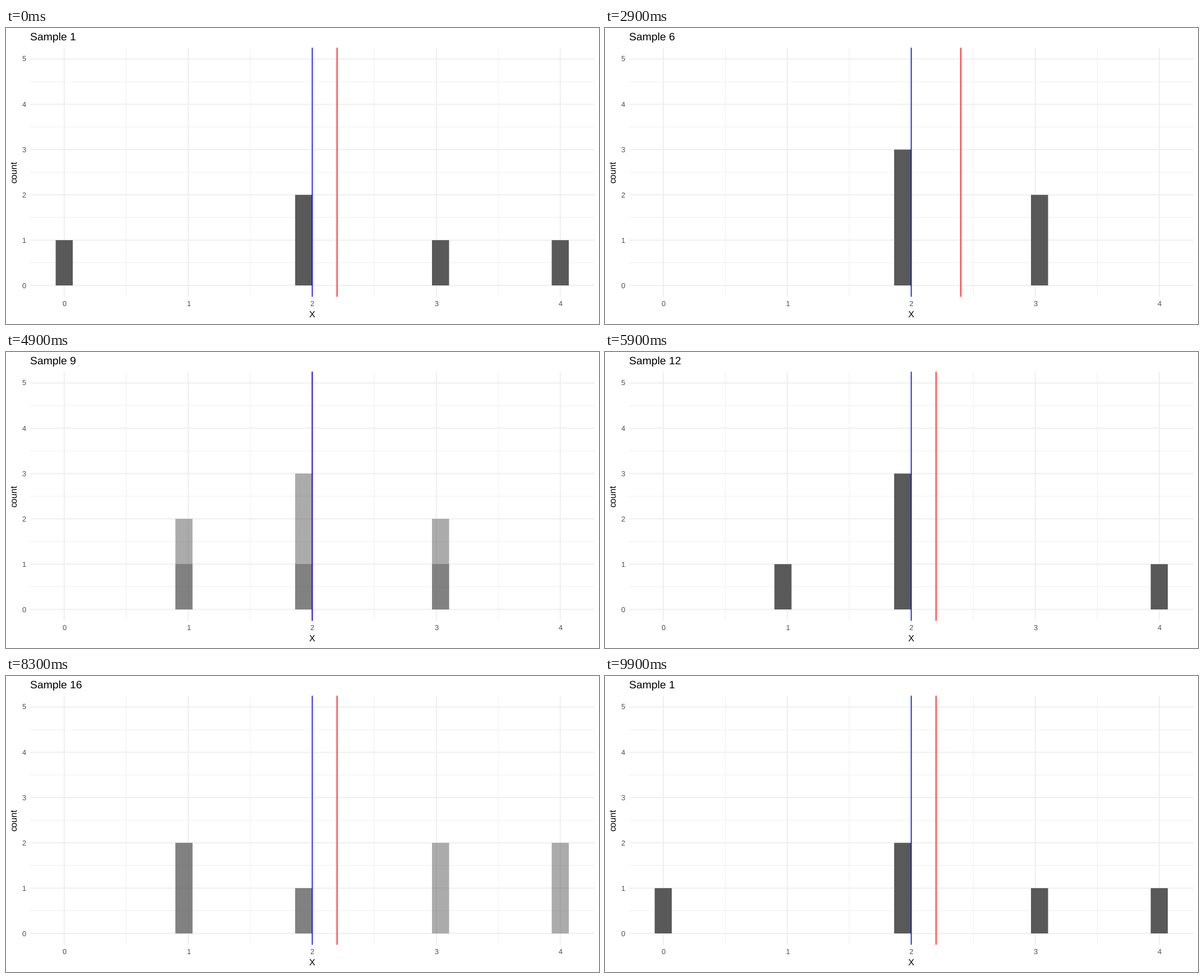
Animation of 1058 by 529 pixels, one loop 10 s. Source, as a matplotlib script:

```python
import matplotlib.pyplot as plt
import numpy as np
from matplotlib.animation import FuncAnimation

plt.rcParams.update({
    "font.family": "Liberation Sans",
    "text.hinting": "none",
    "path.snap": False,
    "lines.solid_capstyle": "butt",
})

W, H, DPI = 1058, 529, 105.8
LEFT, RIGHT, TOP, BOTTOM = 42.86, 1049.92, 35.2, 480.3
BIN = 4 / 29
LINE = 1.067  # points
GRID, BAR, TICK = "#ebebeb", "#595959", "#4d4d4d"

# Five draws per sample, values 0 to 4
SAMPLES = [[int(c) for c in s] for s in (
    "02234", "12223", "12234", "12233", "11223", "22233", "01224",
    "12233", "12223", "11233", "11223", "12224", "12223", "12233",
    "11223", "11233", "11244", "01223", "12233")]
COUNTS = [np.bincount(s, minlength=5) for s in SAMPLES]
MEANS = [np.mean(s) for s in SAMPLES]

# Tenths of a second at which one sample is half blended into the next
FADES = [4, 10, 16, 22, 28, 34, 39, 44, 49] + list(range(53, 99, 5))

fig = plt.figure(figsize=(10, 5), dpi=DPI, facecolor="white")
ax = fig.add_axes([LEFT / W, 1 - BOTTOM / H,
                   (RIGHT - LEFT) / W, (BOTTOM - TOP) / H])
ax.set_xlim(-2 * BIN, 4 + 2 * BIN)
ax.set_ylim(-0.25, 5.25)
ax.axis("off")


def label(x, y, text, size, color="black", **kw):
    """Text placed by pixels from the top left corner, y at the baseline."""
    kw.setdefault("va", "baseline")
    return fig.text(x / W, 1 - y / H, text, fontsize=size, color=color, **kw)


def px(v):
    return LEFT + (v + 2 * BIN) / (4 + 4 * BIN) * (RIGHT - LEFT)


def py(v):
    return BOTTOM - (v + 0.25) / 5.5 * (BOTTOM - TOP)


def grid(xs, ys, width):
    for y in ys:
        ax.axhline(y, color=GRID, lw=width, zorder=1, clip_on=False)
    for x in xs:
        ax.axvline(x, color=GRID, lw=width, zorder=1, clip_on=False)


grid(np.arange(4) + 0.5, np.arange(5) + 0.5, LINE / 2)
grid(range(5), range(6), LINE)

for v in range(5):
    label(px(v), 497, str(v), 8.8, TICK, ha="center")
for v in range(6):
    label(35.6, py(v) + 4.6, str(v), 8.8, TICK, ha="right")
label(px(2), 517.3, "X", 11, ha="center")
label(20, (TOP + BOTTOM) / 2, "count", 11, rotation=90,
      ha="right", va="center").set(ha="center", x=14.7 / W)
title = label(LEFT, 22.4, "", 13.2)

# Right-closed bins, so 2 falls in the bin that ends at 2
centers = np.ceil(np.arange(5) / BIN - 0.5 - 1e-9) * BIN
old_bars, new_bars = (
    ax.bar(centers, np.zeros(5), BIN, color=BAR, linewidth=0, zorder=z)
    for z in (2, 3))
mean_line = ax.axvline(2, color="red", lw=LINE, zorder=4, clip_on=False)
ax.axvline(2, color="blue", lw=LINE, zorder=5, clip_on=False)


def set_bars(bars, counts, alpha):
    for bar, n in zip(bars, counts):
        bar.set_height(n)
        bar.set_alpha(alpha)


def update(frame):
    now = sum(t < frame for t in FADES) % len(SAMPLES)
    nxt = (now + 1) % len(SAMPLES)
    mix = 0.5 if frame in FADES else 0
    set_bars(old_bars, COUNTS[now], 1 - mix)
    set_bars(new_bars, COUNTS[nxt], mix)
    mean = MEANS[now] + mix * (MEANS[nxt] - MEANS[now])
    mean_line.set_xdata([mean, mean])
    title.set_text(f"Sample {now + 1}")
    return []


anim = FuncAnimation(fig, update, frames=100, interval=100,
                     init_func=lambda: update(0), repeat=True, repeat_delay=0)
plt.show()
```
